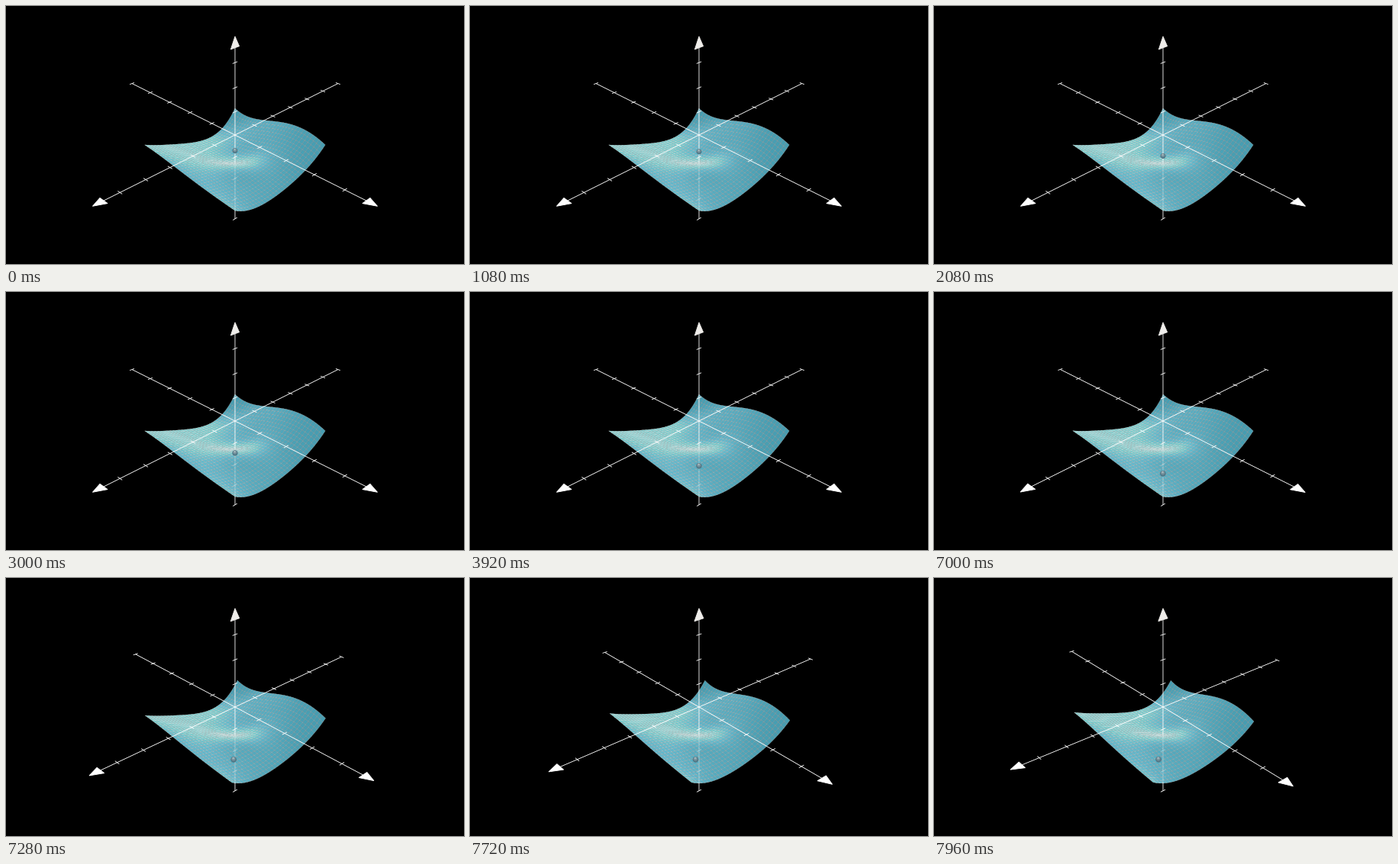
These frames come from a looping animation (600x338 px, 8000 ms). A matplotlib script:

```python
import math
import numpy as np
import matplotlib.pyplot as plt
from matplotlib.animation import FuncAnimation
from matplotlib.collections import LineCollection, PolyCollection
from matplotlib.patches import Circle

W, H, DPI = 600, 338, 100
STEP, FRAMES = 40, 200
UNIT = W * 9 / 128      # pixels per scene unit
FOCAL = 20
PHI = math.radians(60)
PX = 72 / DPI           # one pixel in points


def theta(t):
    return math.pi / 4 + 0.1 * max(0.0, t - 6.98)


def depth(p, th):
    p = np.asarray(p, float)
    toward = p[..., 0] * math.cos(th) + p[..., 1] * math.sin(th)
    return toward * math.sin(PHI) + p[..., 2] * math.cos(PHI)


def project(p, th):
    p = np.asarray(p, float)
    side = p[..., 1] * math.cos(th) - p[..., 0] * math.sin(th)
    toward = p[..., 0] * math.cos(th) + p[..., 1] * math.sin(th)
    up = p[..., 2] * math.sin(PHI) - toward * math.cos(PHI)
    k = UNIT * FOCAL / (FOCAL - depth(p, th))
    return np.stack([W / 2 + side * k, H / 2 - up * k], -1)


def smooth(s):
    s = min(max(s, 0.0), 1.0)
    low = 1 / (1 + math.exp(5))
    return (1 / (1 + math.exp(-10 * (s - 0.5))) - low) / (1 - 2 * low)


# ---- surface: quartic through a 5x5 grid of heights plus a step at the middle ----
NODES = np.arange(-2, 3)
HEIGHTS = np.array([          # rows: y, columns: x
    [-0.546, -1.22, -1.11, -0.77, -0.357],
    [-0.587, -1.08, -1.12, -0.81, -0.457],
    [-0.306, -0.86, -1.05, -0.86, -0.596],
    [-0.15, -0.74, -1.02, -0.97, -0.715],
    [-0.357, -0.90, -1.14, -1.17, -0.80],
])
INV = np.linalg.inv(np.vander(NODES, 5))
COEF = INV @ HEIGHTS @ INV.T
POWERS = np.arange(4, -1, -1)


def height(x, y):
    base = np.einsum('...i,ij,...j', y[..., None] ** POWERS,
                     COEF, x[..., None] ** POWERS)
    return base + 0.28 * (x + y) * np.exp(-(x ** 2 + y ** 2) / 0.7)


N = 32
gx, gy = np.meshgrid(np.linspace(-2, 2, N + 1), np.linspace(-2, 2, N + 1))
grid = np.stack([gx, gy, height(gx, gy)], -1)
quads = np.stack([grid[:-1, :-1], grid[:-1, 1:], grid[1:, 1:], grid[1:, :-1]],
                 2).reshape(-1, 4, 3)
mids = quads.mean(1)

normal = np.cross(quads[:, 2] - quads[:, 0], quads[:, 3] - quads[:, 1])
normal /= np.linalg.norm(normal, axis=1, keepdims=True)
sun = np.array([-7, -9, 10]) - mids
sun /= np.linalg.norm(sun, axis=1, keepdims=True)
light = 0.5 * (normal * sun).sum(1) ** 3
light = np.where(light < 0, light / 2, light)[:, None]
fill = np.clip(np.array([88, 196, 221]) / 255 + light, 0, 1) * 0.8
edge = np.clip(0.733 + light + np.zeros(3), 0, 1)

# ---- axes: (half length, number of units, direction, tick direction) ----
X, Y, Z = np.eye(3)
TIP, TICK = 0.35, 0.1
lines, faint, tips = [], [], []
for half, n, d, side in [(5.25, 6, X, Y), (5.25, 5, Y, X), (3.25, 4, Z, X)]:
    if d is Z:
        lines += [(-half * d, -2.9 * d), (-1.05 * d, (half - TIP) * d)]
        faint.append((-2.9 * d, -1.05 * d))
    else:
        lines.append((-half * d, (half - TIP) * d))
    for i in range(-n, n):
        if i == 0:
            continue
        c = d * half * i / n
        hidden = d is Z and -2.9 < c[2] < -1.05
        (faint if hidden else lines).append((c - TICK * side, c + TICK * side))
    base = (half - TIP) * d
    tips.append([half * d, base + TIP / 2 * side, base - TIP / 2 * side])
lines, faint, tips = map(np.array, (lines, faint, tips))

# ---- stage ----
fig = plt.figure(figsize=(W / DPI, H / DPI), dpi=DPI, facecolor='black')
ax = fig.add_axes([0, 0, 1, 1])
ax.set_xlim(0, W)
ax.set_ylim(H, 0)
ax.axis('off')

sheet = PolyCollection([], linewidths=0.25 * PX, zorder=1)
under = LineCollection([], colors='white', alpha=0.4, linewidths=0.85 * PX, zorder=2)
over = LineCollection([], colors='white', linewidths=0.85 * PX, zorder=3)
heads = PolyCollection([], facecolors=['white', 'white', '#efedea'],
                       edgecolors=['white', 'white', '#efedea'],
                       linewidths=0.85 * PX, joinstyle='miter', zorder=4)
for c in (sheet, under, over, heads):
    c.set_snap(False)
    ax.add_collection(c, autolim=False)

# ball: dark body with lighter layers towards the top
LAYERS = [(1.0, 0.0, '#4b7686'), (0.8, 0.15, '#628391'),
          (0.55, 0.32, '#829ba4'), (0.28, 0.5, '#a9babf')]
ball = [ax.add_patch(Circle((0, 0), 1, fc=col, ec='none', zorder=5))
        for _, _, col in LAYERS]
START, END = np.array([-0.6, -0.6, -1.09]), np.array([0.98, 0.98, -1.02])
RADIUS = 0.088


def draw(i):
    t = i * STEP / 1000
    th = theta(t)
    order = np.argsort(depth(mids, th))
    sheet.set_verts(project(quads[order], th))
    sheet.set_facecolor(fill[order])
    sheet.set_edgecolor(edge[order])
    over.set_segments(project(lines, th))
    under.set_segments(project(faint, th))
    heads.set_verts(project(tips, th))

    pos = START + (END - START) * smooth((t - 0.08) / 6)
    cx, cy = project(pos, th)
    r = RADIUS * UNIT * FOCAL / (FOCAL - depth(pos, th))
    for patch, (size, lift, _) in zip(ball, LAYERS):
        patch.center = (cx - 0.2 * lift * r, cy - lift * r)
        patch.set_radius(size * r)
    return [sheet, under, over, heads, *ball]


anim = FuncAnimation(fig, draw, frames=FRAMES, interval=STEP, repeat=True,
                     init_func=lambda: draw(0))
plt.show()
```
